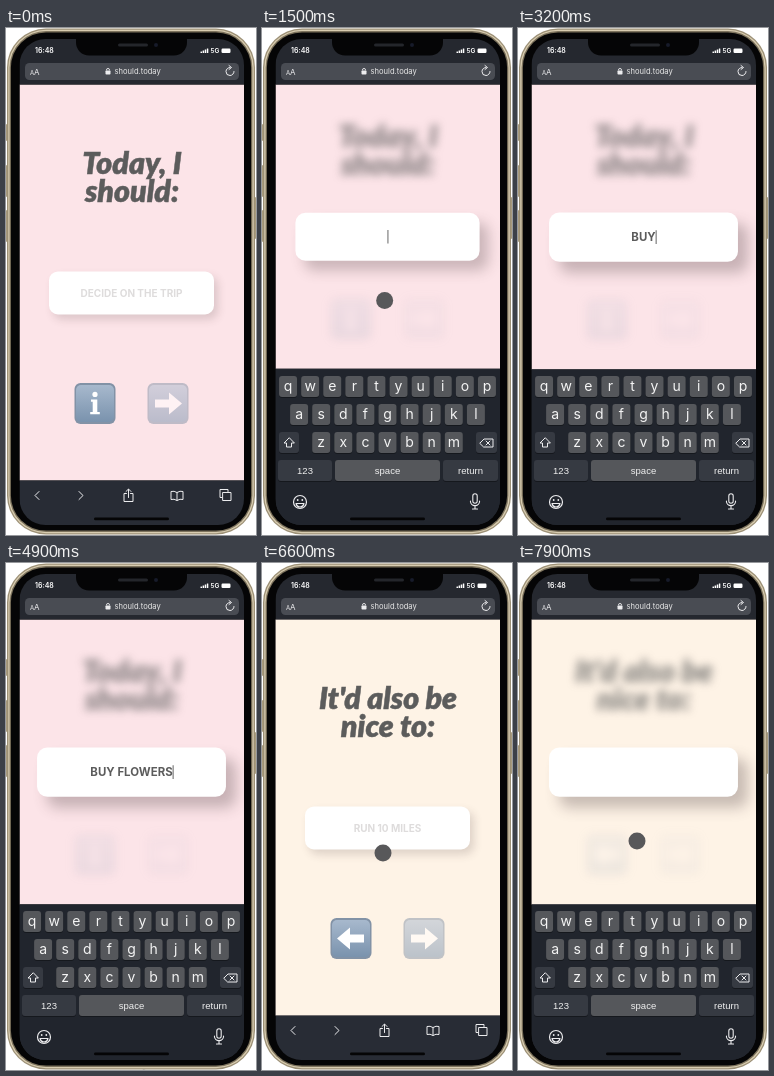
Write an HTML page with a canvas that moves like this. It is 250 px wide and 507 px high and loops after 8 s.

```html
<!DOCTYPE html>
<html lang="en">
<head>
<meta charset="utf-8">
<title>Today list on a phone</title>
<style>
html, body { margin: 0; width: 100%; height: 100%; overflow: hidden; background: #fff; }
canvas { display: block; width: 250px; height: 507px; }
</style>
</head>
<body>
<canvas id="stage"></canvas>
<script>
const W = 250, H = 507, LOOP = 8000, STEP = 100;
const LEFT = 13.5, WIDTH = 224.5, TOP = 56.5, FLOOR = 496.5, MID = 125.5;
const BAR = 44, KEYS = 155;
const S = Math.max(1, window.devicePixelRatio || 1);
const SANS = 'Inter, Roboto, sans-serif';
const INK = '#5c5c5c', PALE = '#ececee', BLACK = '#050506', BRASS = '#a99c7e';

// Moments of the story, in ms.
const FOCUS = 1150, WORD1 = 2700, WORD2 = 3700, SAVE = 5200, TURN = 6100, REFOCUS = 7400;

function surface(canvas) {
  canvas.width = W * S;
  canvas.height = H * S;
  const c = canvas.getContext('2d');
  c.setTransform(S, 0, 0, S, 0, 0);
  return c;
}
const stage = surface(document.getElementById('stage'));
const layer = surface(document.createElement('canvas'));
let g = stage;

const clamp = (v, lo, hi) => Math.min(hi, Math.max(lo, v));
const lerp = (a, b, p) => a + (b - a) * p;

function ease(t, from, time) {
  const p = clamp((t - from) / time, 0, 1);
  return p * p * (3 - 2 * p);
}
// Rises on both taps into the field and falls once in between.
function focused(t, riseTime, fallFrom, fallTime) {
  return ease(t, FOCUS, riseTime) - ease(t, fallFrom, fallTime) + ease(t, REFOCUS, riseTime);
}

function pose(t) {
  const keys = focused(t, 350, SAVE + 300, 600);
  const blur = focused(t, 380, SAVE, 300);
  const keyTop = FLOOR - KEYS * keys;
  return {
    keyTop, blur,
    bottom: keyTop - BAR * (1 - blur),
    grow: focused(t, 490, SAVE + 250, 600),
    next: ease(t, TURN, 400)
  };
}

// Pointer moves: start, duration, destination.
const MOVES = [
  [400, 500, 122, 262], [1430, 600, 140, 540], [4800, 500, 119, 303],
  [5700, 300, 162, 376], [6200, 400, 121, 290], [6600, 800, 119, 278]
];
function pointer(t) {
  return MOVES.reduce(([x, y], [from, time, tx, ty]) => {
    const p = ease(t, from, time);
    return [lerp(x, tx, p), lerp(y, ty, p)];
  }, [150, 540]);
}

function typedText(t) {
  const count = (from, pace, max) => clamp(Math.floor((t - from) / pace) + 1, 0, max);
  return 'BUY FLOWERS'.slice(0, count(WORD1, 200, 3) + count(WORD2, 114, 8));
}
function pressedKey(t) {
  const typed = typedText(t);
  return typed === typedText(t - STEP) ? '' : typed.slice(-1).toLowerCase();
}

function rect(x, y, w, h, r, fill) {
  g.beginPath();
  g.roundRect(x, y, w, h, r);
  g.fillStyle = fill;
  g.fill();
}
function disc(x, y, r, color) {
  g.beginPath();
  g.arc(x, y, r, 0, 7);
  g.fillStyle = color;
  g.fill();
}
function text(s, x, y, font, color, align = 'center') {
  g.font = font;
  g.fillStyle = color;
  g.textAlign = align;
  g.fillText(s, x, y);
}
function icon(path, x, y, width = 1) {
  g.save();
  g.translate(x, y);
  g.strokeStyle = PALE;
  g.lineWidth = width;
  g.lineCap = g.lineJoin = 'round';
  g.stroke(new Path2D(path));
  g.restore();
}

// Draws a group as one picture, so blur and opacity apply to the whole.
function group(alpha, blur, draw) {
  if (alpha <= 0) return;
  layer.clearRect(0, 0, W, H);
  g = layer;
  draw();
  g = stage;
  g.save();
  g.globalAlpha = alpha;
  if (blur > 0) g.filter = `blur(${blur * S}px)`;
  g.drawImage(layer.canvas, 0, 0, W, H);
  g.restore();
}

function heading(lines, y) {
  lines.forEach((s, i) => {
    const base = y + 10 + i * 28.5;
    text(s, 126, base, 'italic 900 30.3px Lato, sans-serif', INK);
    g.strokeStyle = INK;
    g.lineWidth = .5;
    g.strokeText(s, 126, base);
  });
}

function button(kind, x, y) {
  g.save();
  g.translate(x, y);
  const fill = g.createLinearGradient(0, -20, 0, 20);
  fill.addColorStop(0, '#a9bace');
  fill.addColorStop(1, '#7891ac');
  rect(-20.5, -20.5, 41, 41, 6, '#8292a6');
  rect(-19, -18.5, 38, 37, 5, fill);
  if (kind === 'info') {
    disc(0, -9, 2.6, '#fff');
    g.fill(new Path2D('M-4-4h6.3v12.5h2.5v2.2h-9.6v-2.2h2.5v-10.3h-1.7z'));
  } else {
    if (kind === 'back') g.scale(-1, 1);
    g.fillStyle = '#fff';
    g.fill(new Path2D('M-13-4H1v-7L14 0 1 11V4h-14z'));
  }
  g.restore();
}

function inputBox(t, y, grow, next) {
  g.save();
  g.translate(MID, y);
  g.scale(1 + .145 * grow, 1 + .145 * grow);
  g.shadowColor = `rgba(75, 60, 62, ${.18 + .12 * grow})`;
  g.shadowBlur = (9 + 5 * grow) * S;
  g.shadowOffsetX = (4 + 6 * grow) * S;
  g.shadowOffsetY = (5 + 6 * grow) * S;
  rect(-82.5, -21.5, 165, 43, 9, '#fff');
  g.shadowColor = 'transparent';

  const hint = '#dedcdc';
  const label = (s, color, alpha = 1) => {
    g.globalAlpha = alpha;
    text(s, 0, 3.6, `700 10px ${SANS}`, color);
  };
  if (t < FOCUS) label('DECIDE ON THE TRIP', hint);
  else if (t < SAVE) {
    const typed = typedText(t);
    label(typed, INK);
    const blinkedOff = t >= 2200 && t < WORD1;
    if (!blinkedOff) rect(g.measureText(typed).width / 2, -6, .8, 12, 0, '#555');
  } else {
    label('SAVED!', INK, 1 - next);
    if (t < REFOCUS + STEP) label('RUN 10 MILES', hint, next);
  }
  g.restore();
}

function page(t, { bottom, blur, grow, next }) {
  // Content spreads out with the height of the visible page.
  const extra = bottom - 309.5;
  const buttonY = 267.5 + extra * .755;
  const paint = (color, alpha) => {
    g.globalAlpha = alpha;
    rect(LEFT, TOP, WIDTH, bottom - TOP, 0, color);
    g.globalAlpha = 1;
  };
  paint('#fce4e8', 1);
  paint('#fef3e6', next);

  const show = (alpha, lines, left, rightAlpha) => {
    const seen = alpha * (1 - .88 * blur);
    group(alpha * (1 - .35 * blur), blur * 4.2, () => heading(lines, 101 + extra * .244));
    group(seen, blur * 5, () => button(left, 89, buttonY));
    group(seen * rightAlpha, blur * 5, () => button('go', 162, buttonY));
  };
  show(1 - next, ['Today, I', 'should:'], 'info', t < SAVE ? .5 : 1);
  show(next, ["It'd also be", 'nice to:'], 'back', .5);
  inputBox(t, 193 + extra * .503, grow, next);
}

function toolbar(top) {
  rect(LEFT, top, WIDTH, H - top, 0, '#282c35');
  const y = top + 15;
  icon('M2-4l-4 4 4 4', 31, y);
  icon('M-2-4l4 4-4 4', 75, y);
  icon('M-2-2h-2.5v8h9v-8H2M0 2v-8M-2.5-4L0-6.5 2.5-4', 122.5, y);
  icon('M0-3q-3-2-6-1v8q3-1 6 1 3-2 6-1v-8q-3-1-6 1v8', 171, y);
  icon('M-2-3h8v8h-8zM-3 2h-2v-8h8v2', 219, y);
}

function keyboard(top, down) {
  if (top >= FLOOR) return;
  g.save();
  g.translate(0, top + .5);
  rect(LEFT, -.5, WIDTH, 170, 0, '#21252d');

  const light = '#55575b', dark = '#363a42';
  const key = (x, y, w, fill) => {
    rect(x, y + 1, w, 21, 3, '#15181d');
    rect(x, y, w, 21, 3, fill);
  };
  ['qwertyuiop', 'asdfghjkl', 'zxcvbnm'].forEach((row, r) => {
    const y = 6 + 28 * r;
    [...row].forEach((c, i) => {
      const x = MID + (i - (row.length - 1) / 2) * 22.1;
      if (c !== down) key(x - 9, y, 18, light);
      text(c, x, y + 15, `400 14px ${SANS}`, '#f4f4f4');
    });
  });
  key(17, 62, 20, dark);
  key(214, 62, 21, dark);
  const wide = (label, x, w, fill) => {
    key(x, 90, w, fill);
    text(label, x + w / 2, 103.5, '400 9.5px "Liberation Sans", Arial, sans-serif', '#f0f0f0');
  };
  wide('123', 16, 54, dark);
  wide('space', 73, 105, down === ' ' ? dark : light);
  wide('return', 181, 55, dark);

  icon('M0-5l-5 5h2.5v4h5v-4H5z', 27, 73);
  icon('M-6 0l4-4h9v8h-9zM0-2l4 4M4-2l-4 4', 224, 73);
  icon('M-6.5 0a6.5 6.5 0 1 1 13 0 6.5 6.5 0 1 1-13 0M-4 1.5h8q-1 3.5-4 3.5t-4-3.5', 38, 132, 1.2);
  for (const side of [-1, 1]) disc(38 + side * 2.3, 130, .9, PALE);
  icon('M-2.2-5a2.2 2.2 0 0 1 4.4 0v5a2.2 2.2 0 0 1-4.4 0zM-4.6 0a4.6 4.6 0 0 0 9.2 0M0 5v3M-2.5 8h5', 213, 131, 1.1);
  g.restore();
}

function header() {
  rect(LEFT, 10, WIDTH, TOP - 10, 0, '#25282f');
  rect(19, 35, 214, 17, 4.5, '#494c53');
  text('A', 24, 46.5, `400 6px ${SANS}`, PALE, 'left');
  text('A', 28, 46.5, `400 8px ${SANS}`, PALE, 'left');
  rect(99.5, 42.5, 5, 4, .8, PALE);
  icon('M-1.6 0a1.6 1.6 0 0 1 3.2 0', 102, 42, .9);
  text('should.today', 108.5, 46, `400 7.6px ${SANS}`, '#e6e6e6', 'left');
  icon('M4 0a4 4 0 1 1-4-4M-1-6l2.5 2-2.5 2', 224, 43.5);

  text('16:48', 29, 25, `600 7px ${SANS}`, '#fff', 'left');
  for (let i = 0; i < 4; i++) rect(194.5 + i * 2.1, 23.5 - i, 1.5, 1.5 + i, .3, '#fff');
  text('5G', 204.5, 25, `600 6.5px ${SANS}`, '#fff', 'left');
  rect(215.5, 20.5, 9, 4.5, 1.2, '#fff');
}

function body() {
  rect(0, 0, W, H, 0, '#fff');
  for (const y of [137, 182]) rect(0, y, 3, 32, 1, BRASS);
  rect(0, 96, 3, 17, 1, BRASS);
  rect(247, 169, 3, 42, 1, BRASS);
  ['#9c9076', '#d8ccb0', '#7d735d', BLACK].forEach((color, i) => {
    const inset = 1 + i * 1.3;
    rect(inset, inset - .5, W - 2 * inset, H + 1 - 2 * inset, 40 - inset, color);
  });
}

function notch() {
  rect(70, 6, 111, 21.5, [0, 0, 13, 13], BLACK);
  rect(112, 15.5, 30, 3, 1.5, '#24262b');
  disc(150, 17, 2, '#171b2a');
}

function draw(t) {
  const p = pose(t);
  body();
  g.save();
  g.beginPath();
  g.roundRect(LEFT, 11, WIDTH, 486, 26);
  g.clip();
  page(t, p);
  toolbar(p.bottom);
  keyboard(p.keyTop, pressedKey(t));
  header();
  rect(88, 489.5, 75, 2.8, 1.4, BLACK);
  g.restore();
  notch();
  disc(...pointer(t), 8.5, '#58585a');
}

const start = performance.now();
function tick() {
  const t = (performance.now() - start) % LOOP;
  draw(Math.floor(t / STEP) * STEP);
  requestAnimationFrame(tick);
}
tick();
</script>
</body>
</html>
```
